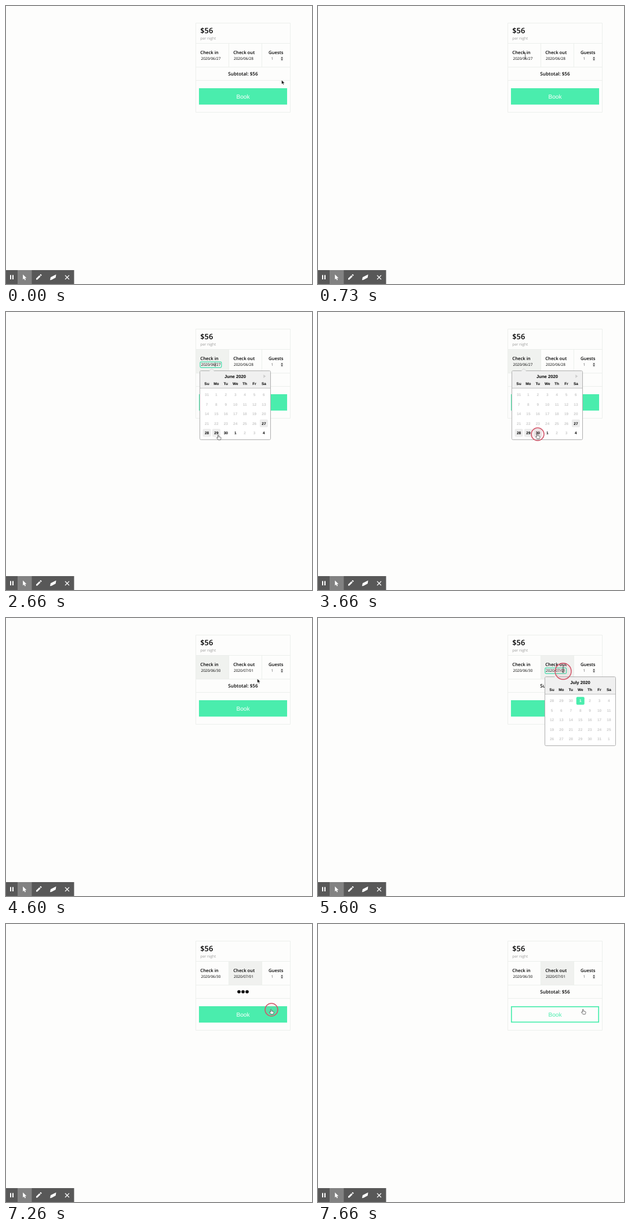
Recreate the animation shown at these times as an HTML page. Size 528 by 480 pixels, loop 8 s.

```html
<!DOCTYPE html>
<html lang="en">
<head>
<meta charset="utf-8">
<title>Booking card</title>
<style>
  html, body { margin: 0; width: 100%; height: 100%; overflow: hidden; background: #fdfdfc; }
  svg { display: block; width: 528px; height: 480px; text-rendering: geometricPrecision; }
  text { font-family: "Open Sans", sans-serif; }
  .label { font-weight: 600; font-size: 7.7px; }
  .date { font-size: 6.4px; }
  .mid { text-anchor: middle; }
  .book { font: 10.1px "Liberation Sans", Arial, sans-serif; }
  .cal text { font: bold 6.5px "Liberation Sans", Arial, sans-serif; text-anchor: middle; }
  .cal .title { font-size: 7.65px; }
  .line { fill: none; stroke: #ecefec; }
  .focus { fill: none; stroke: #3fdcaa; stroke-width: 1.2; }
</style>
</head>
<body>
<svg id="stage" viewBox="0 0 528 480">
  <rect width="528" height="480" fill="#fdfdfc"/>

  <rect id="cellIn" x="328" y="65" width="57" height="41" fill="#f0f2ef"/>
  <rect id="cellOut" x="385" y="65" width="57" height="41" fill="#f0f1ef"/>
  <path class="line" d="M327.5 29.5h163v154h-163zM328 64.5h162M328 105.5h162M328 128.5h162M384.5 65v40M441.5 65v40"/>

  <text x="335.3" y="47" font-size="12.8" font-weight="600">$56</text>
  <text x="335.3" y="57.6" font-size="6.4" fill="#999">per night</text>
  <text class="label" x="335.3" y="83.2">Check in</text>
  <text class="label" x="392.2" y="83.2">Check out</text>
  <text class="label" x="453" y="83.2">Guests</text>
  <text class="date" id="dateIn" x="336.5" y="93.3"></text>
  <text class="date" id="dateOut" x="393" y="93.3"></text>
  <text class="date" x="457.4" y="93.3" fill="#555">1</text>
  <rect x="473.6" y="86.4" width="5" height="9.2" rx="2" fill="#eee"/>
  <path d="M474.4 90.2l1.7-2.3 1.7 2.3zM474.4 91.8l1.7 2.3 1.7-2.3z" fill="#333"/>

  <text class="mid" id="subtotal" x="409" y="120.2" font-size="8.15" font-weight="600">Subtotal: $56</text>
  <g id="dots">
    <circle cx="402" cy="117" r="2.8"/><circle cx="409" cy="117" r="2.8"/><circle cx="416" cy="117" r="2.8"/>
  </g>

  <rect id="button" x="333.8" y="142.8" width="150.4" height="26.6" stroke="#4aedad" stroke-width="1.7"/>
  <text class="book mid" id="buttonText" x="409" y="159.5">Book</text>

  <g id="focusIn"><rect class="focus" x="335" y="86.2" width="36.8" height="9.6" rx="1.5"/></g>
  <g id="focusOut"><rect class="focus" x="391.8" y="86.2" width="36.8" height="9.6" rx="1.5"/></g>
  <path id="caret" d="M0 87.5v7" stroke="#000" stroke-width=".7"/>

  <g class="cal" id="june"></g>
  <g class="cal" id="july" transform="translate(57)"></g>

  <g id="toolbar">
    <rect y="456" width="117.5" height="24" fill="#585858"/>
    <rect x="20" y="456" width="24.5" height="24" fill="#828282"/>
    <path fill="#fff" d="M7 464.5h2v7.5h-2zM11 464.5h2v7.5h-2z
      M29.2 463.5v8.8l2-1.9 1.4 3.1 1.5-.7-1.4-3h2.7z
      M52 472.6v-2.1l5.6-5.6 2.1 2.1-5.6 5.6zM58.3 464.2l1-1q.5-.4 1 0l1.1 1.1q.4.5 0 1l-1 1z
      M76 473.2l1-5 9.5-4.6-.8 5.4-7 3.8z"/>
    <path d="M102 465l7 7m0-7l-7 7" stroke="#fff" stroke-width="1.2"/>
  </g>

  <circle id="ring" fill="#d84a62" fill-opacity=".07" stroke="#d2566a" stroke-width="1.5"/>
  <g id="cursor" stroke-linejoin="round">
    <path id="arrow" d="M0 0v7l1.7-1.5 1.2 2.6 1.2-.6-1.1-2.4h2.3z" fill="#111" stroke="#fff" stroke-width=".5"/>
    <path id="beam" d="M-1.5-8q1.5 0 1.5 1v8q0 1-1.5 1M1.5-8q-1.5 0-1.5 1M0 1q0 1 1.5 1" fill="none" stroke="#333" stroke-width=".7"/>
    <path id="hand" d="M-1.5 4.2v-4q0-.9.8-.9t.8.9v2.3l3 .6q1 .3 1 1.3l-.5 2.2-.5 1.2h-4l-2.4-3.2q-.4-.9.4-1z" fill="#fff" stroke="#333" stroke-width=".7"/>
  </g>
</svg>

<script>
const LOOP = 8000, GREEN = '#4aedad';
const STEP = 16.4, X0 = 346.5, Y0 = 143;
const $ = id => document.getElementById(id);
const show = (id, on) => $(id).setAttribute('display', on ? 'inline' : 'none');
const clamp = v => Math.min(1, Math.max(0, v));
const mix = (a, b, k) => a + (b - a) * k;

function add(parent, tag, attrs, text) {
  const node = document.createElementNS('http://www.w3.org/2000/svg', tag);
  for (const name in attrs) node.setAttribute(name, attrs[name]);
  if (text !== undefined) node.textContent = text;
  parent.append(node);
  return node;
}

// first: date in the top left cell; last: length of the month it belongs to
function buildCalendar(id, title, first, last, length, enabled) {
  const root = $(id), days = [];
  add(root, 'rect', { x: 334.5, y: 101.5, width: 122, height: 119, rx: 2, fill: '#fff', stroke: '#aeaeae' });
  add(root, 'path', { d: 'M335 131.5v-28q0-1.5 1.5-1.5h118q1.5 0 1.5 1.5v28z', fill: '#f0f0f0' });
  add(root, 'path', { d: 'M335 131.5h121', stroke: '#aeaeae', 'stroke-width': .7 });
  add(root, 'path', { d: 'M350.5 102l4.5-4.4 4.5 4.4', fill: '#f0f0f0', stroke: '#c4c4c4', 'stroke-width': .6 });
  add(root, 'text', { x: 395.5, y: 113.7, class: 'title' }, title);
  ['Su', 'Mo', 'Tu', 'We', 'Th', 'Fr', 'Sa'].forEach((name, i) =>
    add(root, 'text', { x: X0 + i * STEP, y: 126.2 }, name));
  for (let i = 0, n = first, max = last; i < 35; i++, n++) {
    if (n > max) { n = 1; max = length; }
    const x = X0 + i % 7 * STEP, y = Y0 + Math.floor(i / 7) * STEP;
    const box = add(root, 'rect', { x: x - 7, y: y - 6.8, width: 14, height: 13.6, rx: 2 });
    const label = add(root, 'text', { x, y: y + 2.3 }, n);
    days.push({ box, label, on: enabled.includes(i) });
  }
  return days;
}

const june = buildCalendar('june', 'June 2020', 31, 31, 30, [27, 28, 29, 30, 31, 34]);
const july = buildCalendar('july', 'July 2020', 28, 30, 31, [3]);
add($('june'), 'path', { d: 'M444.3 108v6l4-3z', fill: '#ccc' });

function paint(days, from, to, hover) {
  days.forEach(({ box, label, on }, i) => {
    const marked = i >= from && i <= to;
    box.setAttribute('fill', !marked ? 'none' : hover ? '#ededed' : GREEN);
    label.setAttribute('fill', marked && !hover ? '#fff' : on ? '#000' : '#ccc');
  });
}

// pointer path: time, x, y
const path = [
  [0, 475.5, 128], [20, 475.5, 128], [380, 408, 104], [660, 356, 87], [860, 361, 93],
  [1600, 361, 93], [2020, 385, 297], [2260, 378, 284], [2290, 378, 284], [2660, 367, 213],
  [2820, 367, 213], [3200, 379, 211], [4599, 379, 211], [4600, 433.5, 105], [4680, 441, 94],
  [4800, 428, 85], [5000, 423, 91], [5199, 423, 91], [5200, 423, 92], [5820, 423, 92],
  [6200, 490, 249.5], [6340, 496, 266], [6660, 484, 206], [6690, 484, 206], [7060, 458, 148],
  [LOOP, 458, 148]
];
// press, release, fade length
const clicks = [[1460, 1580, 250], [3400, 3800, 330], [5600, 5660, 100], [7060, 7260, 200]];

function pointer(t) {
  const i = path.findIndex(p => p[0] > t);
  const [t0, x0, y0] = path[i - 1], [t1, x1, y1] = path[i];
  const k = (t - t0) / (t1 - t0), e = mix(k, k * k * (3 - 2 * k), .5);
  return [mix(x0, x1, e), mix(y0, y1, e)];
}

function dayAt(days, x, y) {
  const col = Math.round((x - X0) / STEP), row = Math.round((y - Y0) / STEP);
  const i = row * 7 + col;
  return col >= 0 && col < 7 && row >= 0 && row < 5 && days[i].on ? i : -1;
}

function drawRing(t, x, y) {
  const click = clicks.find(([down, up, fade]) => t >= down && t < up + fade);
  show('ring', click);
  if (!click) return;
  const [down, up, fade] = click, out = clamp((t - up) / fade);
  const r = mix(14, 11, clamp((t - down) / 180));
  const ring = $('ring');
  ring.setAttribute('cx', x);
  ring.setAttribute('cy', y);
  ring.setAttribute('r', mix(r, 15, out));
  ring.setAttribute('opacity', 1 - out);
}

function render(t) {
  const [x, y] = pointer(t);
  const juneOpen = t >= 1460 && t < 3800, julyOpen = t >= 5600 && t < 7260;
  const focusIn = t >= 1460 && t < 3400, focusOut = t >= 5600 && t < 7060;
  const loading = t >= 3800 && t < 4130 || t >= 7260 && t < 7600;

  show('cellIn', t >= 1460 && t < 5600);
  show('cellOut', t >= 5600);
  $('dateIn').textContent = t < 3800 ? '2020/06/27' : '2020/06/30';
  $('dateOut').textContent = t < 3800 ? '2020/06/28' : '2020/07/01';
  show('focusIn', focusIn);
  show('focusOut', focusOut);
  const blink = (t - (focusIn ? 1460 : 5600)) % 1000 < 500;
  show('caret', (focusIn || focusOut) && blink);
  $('caret').setAttribute('transform', `translate(${focusIn ? 361 : 423})`);

  show('dots', loading);
  show('subtotal', !loading);
  show('june', juneOpen);
  show('july', julyOpen);

  const hover = juneOpen ? dayAt(june, x, y) : julyOpen ? dayAt(july, x - 57, y) : -1;
  if (juneOpen) paint(june, 27, hover > 27 ? hover : 28, hover >= 27);
  if (julyOpen) paint(july, 3, 3, false);

  const k = clamp((t - 7330) / 200);
  $('button').setAttribute('fill', `rgb(${mix(74, 253, k)},${mix(237, 253, k)},${mix(173, 252, k)})`);
  $('buttonText').setAttribute('fill', `rgb(${mix(255, 74, k)},${mix(255, 237, k)},${mix(255, 173, k)})`);

  const overInput = y > 84 && y < 97 && (x > 335 && x < 372 || x > 392 && x < 429);
  const overButton = !juneOpen && !julyOpen && x > 333 && x < 485 && y > 142 && y < 170;
  const kind = overInput ? 'beam' : hover >= 0 || overButton ? 'hand' : 'arrow';
  ['arrow', 'beam', 'hand'].forEach(id => show(id, id === kind));
  $('cursor').setAttribute('transform', `translate(${x} ${y})`);
  drawRing(t, x, y);
}

const start = performance.now();
function tick() {
  render((performance.now() - start) % LOOP);
  requestAnimationFrame(tick);
}
tick();
</script>
</body>
</html>
```
